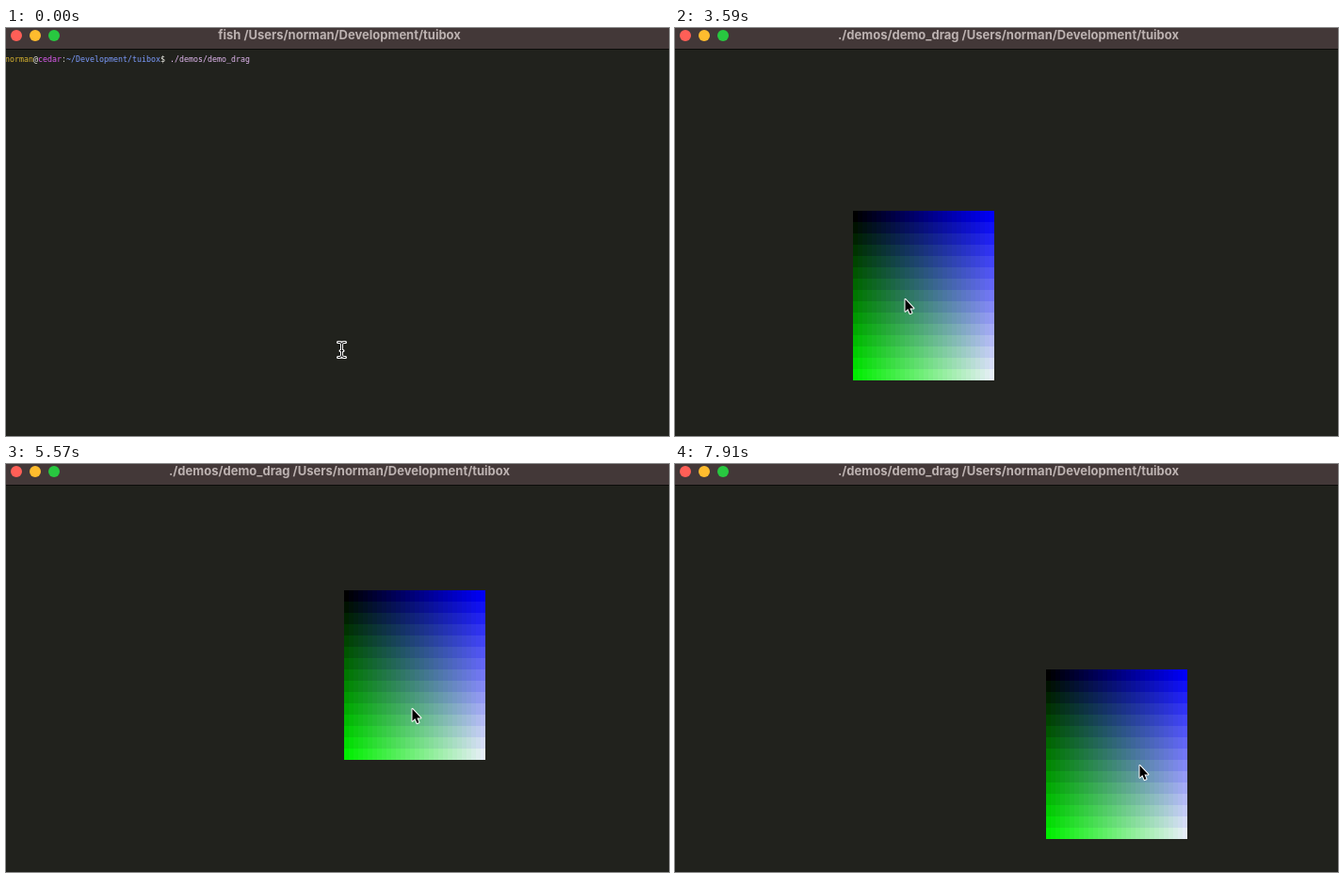
Recreate the animation shown at these times as an HTML page with a canvas. Size 704 by 433 pixels, loop 8 s.

```html
<!DOCTYPE html>
<html lang="en">
<head>
<meta charset="utf-8">
<title>Terminal drag demo</title>
<style>
  html, body { margin: 0; height: 100%; overflow: hidden; background: #21221d; }
  canvas { display: block; }
</style>
</head>
<body>
<canvas id="stage" width="704" height="433"></canvas>
<script>
const ctx = document.getElementById('stage').getContext('2d');
const LOOP = 8000, STEP = 90;
const CELL_W = 5, CELL_H = 12, COLS = 30, ROWS = 15;
const GRAB = { x: 79, y: 101 };   // pointer relative to the box corner

const PROMPT = [
  ['norman', '#d8b430'], ['@', '#f0f0e8'], ['cedar', '#de5cf2'], [':', '#c0c0b8'],
  ['~/Development/tuibox', '#7c9cff'], ['$ ', '#f0f0e8'], ['./demos/demo_drag', '#e2b8f0']
];

// Drags: start time, then one col,row pair per step
const drags = [
  [2780, '9,9 17.2,8 30,8 44,7 55,7 60,7'],
  [3410, '58,8 49,12 38,14 28.2,12.6 26,12 32,11 45,10.6 60,10.6 73,11 ' +
         '84,11.4 92,12.4 97,12 99,11 99,9 97,7 95,5 93,4 90,3 85,3 79,3 75,3'],
  [5480, '75,5 72,9 69,13 61,15.6 51,17 41,18 34,18'],
  [6290, '31,18 24,18 16,17 12,14.2 9,12 7,10 7,8 7,6 7,4 8,4 11,7 19,11 31,14 41,16 48,16'],
  [7730, '54,16 66,16 79,16 87,16']
].map(([start, path]) => ({ start, path: path.split(' ').map(p => p.split(',').map(Number)) }));

const cellX = col => col * CELL_W - 1;
const cellY = row => row * CELL_H + 26;

function rect(x, y, w, h, color) {
  ctx.fillStyle = color;
  ctx.fillRect(x, y, w, h);
}

function drawTitle(text) {
  rect(0, 0, 704, 22, '#433838');
  rect(0, 22, 704, 1, '#0c0c0a');
  ['#ff5f57', '#febc2e', '#28c840'].forEach((color, i) => {
    ctx.fillStyle = color;
    ctx.beginPath();
    ctx.arc(11 + 20 * i, 8, 6, 0, 7);
    ctx.fill();
  });
  ctx.font = '700 13px Inter, sans-serif';
  ctx.textAlign = 'center';
  ctx.fillStyle = '#bcb2b1';
  ctx.fillText(text, 354, 12);
}

function drawPrompt(blockOn) {
  ctx.font = '8.305px "DejaVu Sans Mono", monospace';
  ctx.textAlign = 'left';
  let col = 0;
  for (const [text, color] of PROMPT) {
    ctx.fillStyle = color;
    ctx.fillText(text, cellX(col), 36);
    col += text.length;
  }
  if (blockOn) rect(cellX(col), 26, CELL_W, CELL_H, '#cccccc');
}

function drawBox(col, row) {
  for (let y = 0; y < ROWS; y++) {
    for (let x = 0; x < COLS; x++) {
      const u = x / COLS, v = y / ROWS;
      const rgb = [u * v, v, u].map(c => Math.round(255 * c));
      rect(cellX(col + x), cellY(row + y), CELL_W, CELL_H, `rgb(${rgb})`);
    }
  }
}

const ARROW = new Path2D('M0 .5V13.2L2.8 10.6L5 15.6L7 14.8L4.9 9.9H8.9Z');
const BEAM = new Path2D('M-4 -8H-2.5Q0 -8 0 -5.5V5.5Q0 8 -2.5 8H-4M4 -8H2.5Q0 -8 0 -5.5M0 5.5Q0 8 2.5 8H4M-1.5 1H1.5');

function drawPointer(shape, x, y) {
  ctx.save();
  ctx.translate(x + .5, y + .5);
  ctx.lineJoin = 'round';
  ctx.lineCap = 'round';
  ctx.strokeStyle = '#fff';
  ctx.lineWidth = shape === BEAM ? 3 : 2;
  ctx.stroke(shape);
  if (shape === BEAM) {
    ctx.strokeStyle = '#000';
    ctx.lineWidth = 1;
    ctx.lineCap = 'butt';
    ctx.stroke(shape);
  } else {
    ctx.fillStyle = '#000';
    ctx.fill(shape);
  }
  ctx.restore();
}

// Box cell and pointer while dragging; the box trails the pointer by half a step
function dragState(t) {
  const { start, path } = drags.filter(d => d.start <= t).pop();
  const i = Math.min(Math.floor((t - start) / STEP), path.length - 1);
  const [col, row] = path[i];
  const [nextCol, nextRow] = path[i + 1] || path[i];
  return {
    col: Math.round(col), row: Math.round(row),
    x: Math.round(cellX((col + nextCol) / 2) + GRAB.x),
    y: Math.round(cellY((row + nextRow) / 2) + GRAB.y)
  };
}

function approach(t) {
  const k = Math.min(Math.floor((t - 1530) / 88) + 1, 7) / 7;
  const e = k * k * (3 - 2 * k);
  return { col: 9, row: 9, x: Math.round(356 - 233 * e), y: Math.round(338 - 107 * e) };
}

function draw(t) {
  const running = t >= 990;
  rect(0, 0, 704, 433, '#21221d');
  drawTitle((running ? './demos/demo_drag' : 'fish') + ' /Users/norman/Development/tuibox');
  if (!running) drawPrompt(t >= 180 && t < 720);
  if (t < 1530) {
    if (t >= 1080) drawBox(9, 9);
    drawPointer(BEAM, 356, 341);
  } else {
    const s = t < 2780 ? approach(t) : dragState(t);
    drawBox(s.col, s.row);
    drawPointer(ARROW, s.x, s.y);
  }
}

const begin = performance.now();
function tick() {
  draw((performance.now() - begin) % LOOP);
  requestAnimationFrame(tick);
}
tick();
</script>
</body>
</html>
```
